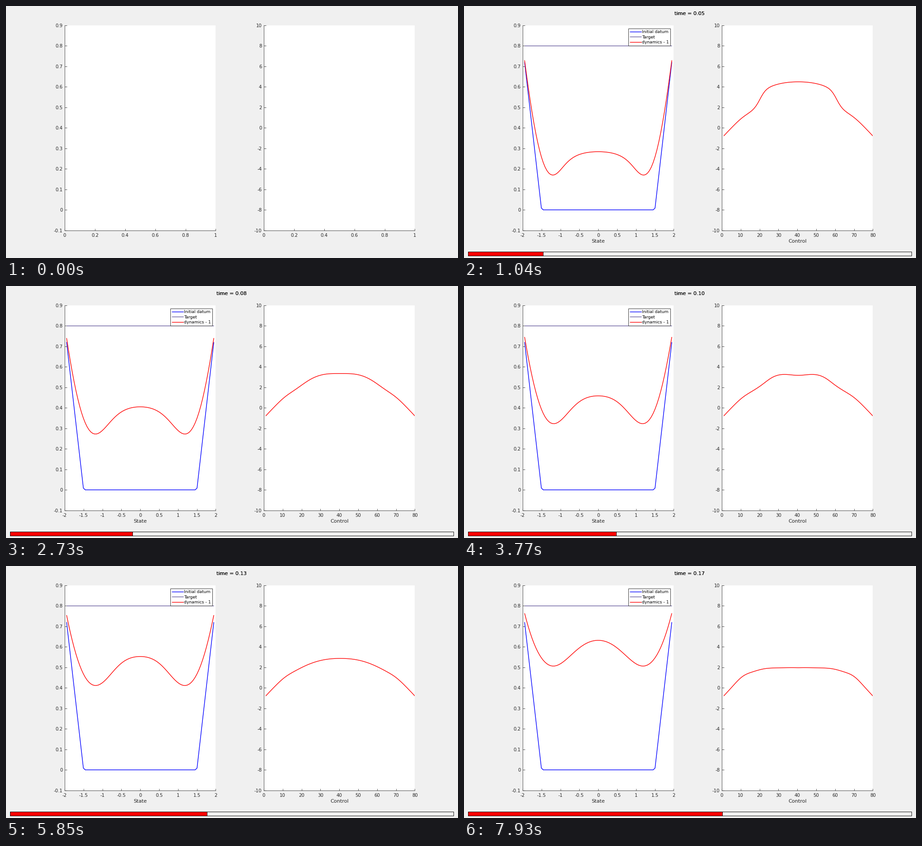
These frames come from a looping animation (1001 by 559 pixels, 8000 ms). A matplotlib script:

```python
import numpy as np
import matplotlib.pyplot as plt
from matplotlib.animation import FuncAnimation
from matplotlib.patches import Rectangle

W, H, DPI = 1001, 559, 72
LOOP, STEPS = 8000, 62
T_END, DT = 0.3, 0.0002
GOAL = 0.8
INK = "#262626"
RED, BLUE, VIOLET = "#ff0000", "#0000ff", "#665a9e"

plt.rcParams.update({"font.family": "DejaVu Sans", "font.size": 10.2})

x = np.linspace(-1.95, 1.95, 80)
dx = x[1] - x[0]
dist = np.abs(x) / 1.95
initial = np.maximum(0, 1.6 * (np.abs(x) - 1.5))

# Control shape over time: step height, step radius, step softness, centre dip.
PHASES = np.array([
    # time   height radius soft  dip
    [0.0000, 3.90, 0.575, 0.05, 0.00],
    [0.0507, 1.62, 0.513, 0.04, 0.00],
    [0.0828, 0.60, 0.480, 0.09, 0.12],
    [0.1008, 0.65, 0.420, 0.06, 0.35],
    [0.1163, 0.75, 0.400, 0.03, 0.55],
    [0.1336, 0.00, 0.390, 0.06, 0.00],
    [0.1520, -0.68, 0.390, 0.10, 0.00],
    [0.1720, -0.93, 0.390, 0.11, 0.00],
])


def control(t):
    """Arch with a soft step, a dip in the middle and slight shoulders."""
    height, radius, soft, dip = (np.interp(t, PHASES[:, 0], col)
                                 for col in PHASES.T[1:])
    arch = 2.86 - 3.66 * dist**2.15
    step = height / (1 + np.exp((dist - radius) / soft))
    shoulder = 0.1 + 0.15 * max(0, -height)
    return (arch + step - dip * np.exp(-(dist / 0.2)**2)
            + shoulder * np.exp(-((dist - 0.75) / 0.13)**2))


def clock(step):
    """Simulated time of a step, at a slightly uneven pace."""
    n = step - 8
    return 0.0507 + 0.00229 * n + 0.0023 * np.sin(2 * np.pi * n / 53)


def simulate(t_end):
    """Controlled heat equation with both ends held at the goal."""
    u, history = initial, [initial]
    for i in range(int(t_end / DT) + 1):
        bend = np.diff(np.pad(u, 1, constant_values=GOAL), 2) / dx**2
        u = u + DT * (bend + control(i * DT))
        history.append(u)
    return history


states = simulate(clock(STEPS))

fig = plt.figure(figsize=(W / DPI, H / DPI), dpi=DPI, facecolor="#f0f0f0")


def set_x_axis(ax, lo, hi, count):
    ticks = np.linspace(lo, hi, count)
    ax.set_xlim(lo, hi)
    ax.set_xticks(ticks, [f"{round(v, 2):g}" for v in ticks])


def panel(left, lo, hi, count):
    ax = fig.add_axes([left / W, 61.2 / H, 334.4 / W, 455.2 / H])
    ax.spines[["top", "right"]].set_visible(False)
    for side in ("left", "bottom"):
        ax.spines[side].set(color=INK, linewidth=0.8)
    ax.tick_params(direction="in", length=4.5, width=0.8, color=INK,
                   labelcolor=INK)
    ax.tick_params(axis="x", pad=6)
    ax.tick_params(axis="y", pad=4.6)
    ticks = np.linspace(lo, hi, count)
    ax.set_ylim(lo, hi)
    ax.set_yticks(ticks, [f"{round(v, 2) + 0:g}" for v in ticks])
    return ax


ax_state = panel(130, -0.1, 0.9, 11)
ax_ctrl = panel(571, -10, 10, 11)

style = dict(linewidth=1.4, solid_joinstyle="round", solid_capstyle="butt")
init_line, = ax_state.plot(x, initial, color=BLUE, **style)
goal_line, = ax_state.plot(x, np.full_like(x, GOAL), color=VIOLET, **style)
state_line, = ax_state.plot(x, initial, color=RED, **style)
ctrl_line, = ax_ctrl.plot(np.arange(1, 81), control(0), color=RED, **style)

# Overlay in pixels, y downwards, for labels, legend and progress bar.
top = fig.add_axes([0, 0, 1, 1])
top.set(xlim=(0, W), ylim=(H, 0))
top.axis("off")


def box(left, upper, w, h, face, edge):
    return top.add_patch(Rectangle((left, upper), w, h, facecolor=face,
                                   edgecolor=edge, linewidth=0.9))


def label(px, py, text, size, ha="center", color=INK):
    return top.text(px, py, text, fontsize=size, ha=ha, va="baseline",
                    color=color)


extras = [init_line, goal_line, state_line, ctrl_line]
extras += [label(297.5, 525.3, "State", 11.25),
           label(738.5, 525.3, "Control", 11.25)]

extras.append(box(364, 50, 93, 38, "white", INK))
for row, (color, name) in enumerate([(BLUE, "Initial datum"),
                                     (VIOLET, "Target"),
                                     (RED, "dynamics - 1")]):
    y = 56.5 + 11.8 * row
    extras += top.plot([367, 393], [y, y], color=color, **style)
    extras.append(label(394.3, y + 3.3, name, 9.2, "left", "black"))

# Doubled text gives the title its heavier weight.
titles = [label(499.6, 20, "", 11.25, color="black") for _ in range(2)]
extras += titles
extras.append(box(9, 545, 982, 9, "#f0f0f0", "black"))
bar = box(9, 545, 0, 9, RED, "black")
extras.append(bar)


def draw(step):
    started = step > 0
    for item in extras:
        item.set_visible(started)
    if not started:
        set_x_axis(ax_state, 0, 1, 6)
        set_x_axis(ax_ctrl, 0, 1, 6)
        return extras
    set_x_axis(ax_state, -2, 2, 9)
    set_x_axis(ax_ctrl, 0, 80, 9)
    t = clock(step)
    state_line.set_ydata(states[round(t / DT)])
    ctrl_line.set_ydata(control(t))
    for title in titles:
        title.set_text(f"time = {t:.2f}")
    bar.set_width(982 * t / T_END)
    return extras


anim = FuncAnimation(fig, draw, frames=STEPS, interval=LOOP / STEPS,
                     repeat=True, repeat_delay=0, blit=False)
plt.show()
```
